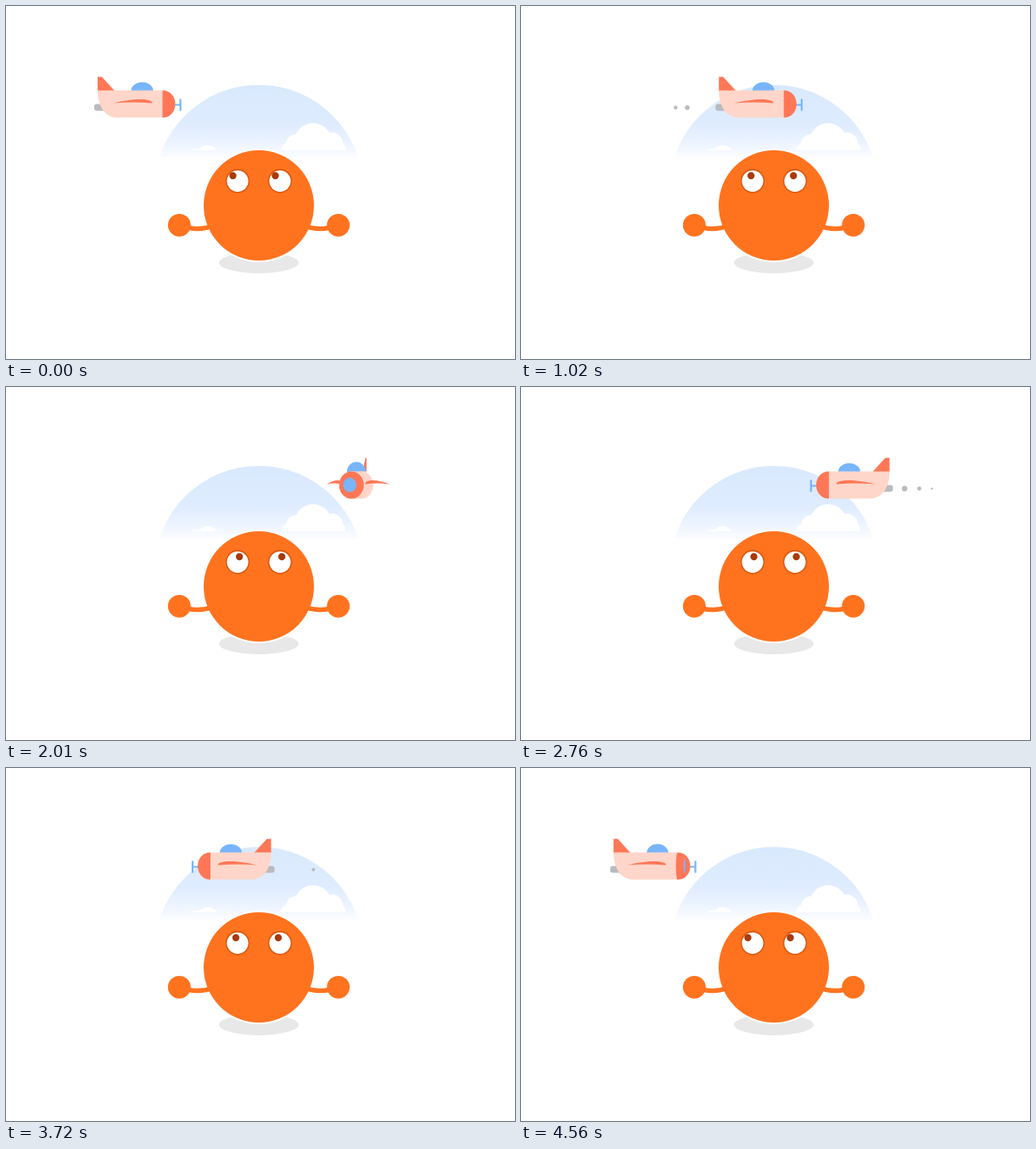
An HTML page with a canvas for the animation above (4.59 s loop, 600 by 416 pixels).

```html
<!DOCTYPE html>
<html lang="en">
<head>
<meta charset="utf-8">
<title>Plane watcher</title>
<style>
  html, body { margin: 0; width: 100%; height: 100%; overflow: hidden; background: #fff; }
  canvas { display: block; width: 600px; height: 416px; }
</style>
</head>
<body>
<canvas id="stage" width="600" height="416"></canvas>
<script>
const ctx = document.getElementById('stage').getContext('2d');
const LOOP = 4590, HALF = LOOP / 2, TURN = 1620, STEP = 30;
const BALL = '#ff731f', CORAL = '#ff7757', PINK = '#ffd6c9', BLUE = '#78b5fd', GREY = '#b9bbbe';

// One flight per direction; the second is the mirror of the first.
// Puffs are [time of release, radius].
const flights = [
  { start: 184.5, speed: 0.1228, tail: 76.5,
    puffs: [[40, 1.6], [125, 2.3], [245, 3], [613, 3.7], [725, 2.7], [1130, 2.5], [1260, 3]] },
  { start: 178, speed: 0.127, tail: 71.5,
    puffs: [[80, 1.6], [197, 2.4], [333, 3.2], [640, 3], [760, 2.4], [1040, 2.6]] }
];

const mix = (a, b, k) => a + (b - a) * k;
const smooth = k => k * k * (3 - 2 * k);

function fill(color, draw) {
  ctx.fillStyle = color;
  ctx.beginPath();
  draw();
  ctx.fill();
}
function oval(x, y, rx, ry = rx) {
  ctx.moveTo(x + rx, y);
  ctx.ellipse(x, y, rx, ry, 0, 0, Math.PI * 2);
}

function pose(flight, next, t) {
  const nose = u => flight.start + flight.speed * u;
  if (t < TURN) return { x: nose(t), angle: 0, tail: flight.tail };
  const k = (t - TURN) / (HALF - TURN);
  return {
    x: mix(nose(TURN), 600 - next.start, smooth(k)),
    angle: Math.PI * k,
    tail: mix(flight.tail, next.tail, k)
  };
}

function drawSky() {
  const g = ctx.createLinearGradient(0, 93, 0, 179);
  g.addColorStop(0, '#d9e9fd');
  g.addColorStop(0.55, '#dfecff');
  g.addColorStop(0.78, '#ebf3ff');
  g.addColorStop(1, '#fcfdff');
  ctx.save();
  ctx.beginPath();
  ctx.rect(170, 90, 260, 89);
  ctx.clip();
  fill(g, () => oval(298, 216, 123));
  ctx.restore();

  ctx.save();
  ctx.beginPath();
  ctx.rect(200, 130, 220, 40);
  ctx.clip();
  fill('#fff', () => {
    oval(362, 160, 22);
    oval(342, 163, 12);
    oval(333, 170, 9);
    oval(384, 162, 13);
    oval(391, 168, 9);
    oval(238, 177, 13);
    oval(225, 179, 11);
  });
  ctx.restore();
}

function drawBall(look) {
  fill('#e8e8e8', () => oval(298, 302.5, 47, 12.5));
  fill('#fff', () => oval(298, 235, 67));
  ctx.strokeStyle = BALL;
  ctx.lineWidth = 5.5;
  for (const side of [-1, 1]) {
    ctx.beginPath();
    ctx.moveTo(298 + side * 84, 261);
    ctx.quadraticCurveTo(298 + side * 69, 265, 298 + side * 54, 259);
    ctx.stroke();
    fill(BALL, () => oval(298 + side * 93.7, 258.3, 13.4));
  }
  fill(BALL, () => oval(298, 235, 65));
  for (const x of [0, 50]) {
    fill('#d9590f', () => oval(273 + x, 206.3, 14.2));
    fill('#fff', () => oval(273 + x, 206.3, 12.6));
    fill('#a93a0c', () => oval(look + x, 200, 4.2));
  }
}

function drawPuffs(flight, t) {
  for (const [at, r] of flight.puffs) {
    const age = t - at;
    if (age < 60 || age > 480) continue;
    const size = r * Math.min(1, (480 - age) / 120);
    const x = flight.start + flight.speed * at - flight.tail - 1;
    fill(GREY, () => oval(x, 119.7, size));
  }
}

// Lateral points move with s, points along the fuselage with c.
function drawPlane({ x, angle, tail }) {
  const c = Math.cos(angle), s = Math.sin(angle);
  const shift = (76.5 - tail) * 0.65;

  const wing = side => {
    const root = (shift - 12) * c + side * 14 * s;
    const tip = (shift - 58 + 23 * s) * c + side * 38 * s;
    fill(CORAL, () => {
      ctx.moveTo(root, -1);
      ctx.bezierCurveTo(root, -7, mix(root, tip, 0.5), -7, tip, -1);
      ctx.quadraticCurveTo(mix(root, tip, 0.5), -3, root, -1);
    });
  };
  const along = draw => {
    ctx.save();
    ctx.scale(c, 1);
    draw();
    ctx.restore();
  };
  const front = c > 0 ? -1 : 1;

  ctx.save();
  ctx.translate(x, 115.6);
  wing(-front);
  along(() => {
    fill(GREY, () => ctx.roundRect(-tail - 4, 0, 14, 8, 3));
    fill(CORAL, () => {
      ctx.moveTo(-tail, -32);
      ctx.lineTo(5 - tail, -32);
      ctx.lineTo(20.5 - tail, -15);
      ctx.lineTo(-tail, -15);
    });
  });
  fill(BLUE, () => ctx.ellipse(-24 * c, -15.5, 13 - 2 * s, 10.3 + 1.5 * s, 0, Math.PI, 0));
  fill(PINK, () => {
    oval(-50 * c, 0, 14 * s, 16);
    oval(0, 0, 14 * s, 16);
  });
  along(() => fill(PINK, () => {
    ctx.moveTo(-tail, -16);
    ctx.lineTo(0.5, -16);
    ctx.lineTo(0.5, 16);
    ctx.lineTo(22 - tail, 16);
    ctx.bezierCurveTo(8 - tail, 15, -tail, 2, -tail, -16);
  }));
  wing(front);

  along(() => {
    fill(BLUE, () => {
      ctx.rect(13, 0, 8, 2);
      ctx.rect(20, -6, 2.2, 14);
    });
    fill(CORAL, () => {
      ctx.moveTo(0, -16);
      ctx.bezierCurveTo(20, -16, 20, 16, 0, 16);
    });
  });
  if (s > 0.02) {
    fill(CORAL, () => oval(0, 0, 15 * s, 16));
    fill(BLUE, () => oval(8 * c, 0, 8 * s, 8.5));
  }
  ctx.restore();
  return x - 31 * c;
}

function frame(now) {
  const t = Math.floor(now % LOOP / STEP) * STEP;
  const back = t >= HALF ? 1 : 0;
  const u = t - back * HALF;
  const flight = flights[back], other = flights[1 - back];

  ctx.clearRect(0, 0, 600, 416);
  drawSky();
  ctx.save();
  if (back) {
    ctx.translate(600, 0);
    ctx.scale(-1, 1);
  }
  drawPuffs(flight, u);
  const mid = drawPlane(pose(flight, other, u));
  ctx.restore();

  const planeX = back ? 600 - mid : mid;
  drawBall(267.5 + (planeX - 155) * 0.0295);
  requestAnimationFrame(frame);
}
requestAnimationFrame(frame);
</script>
</body>
</html>
```
